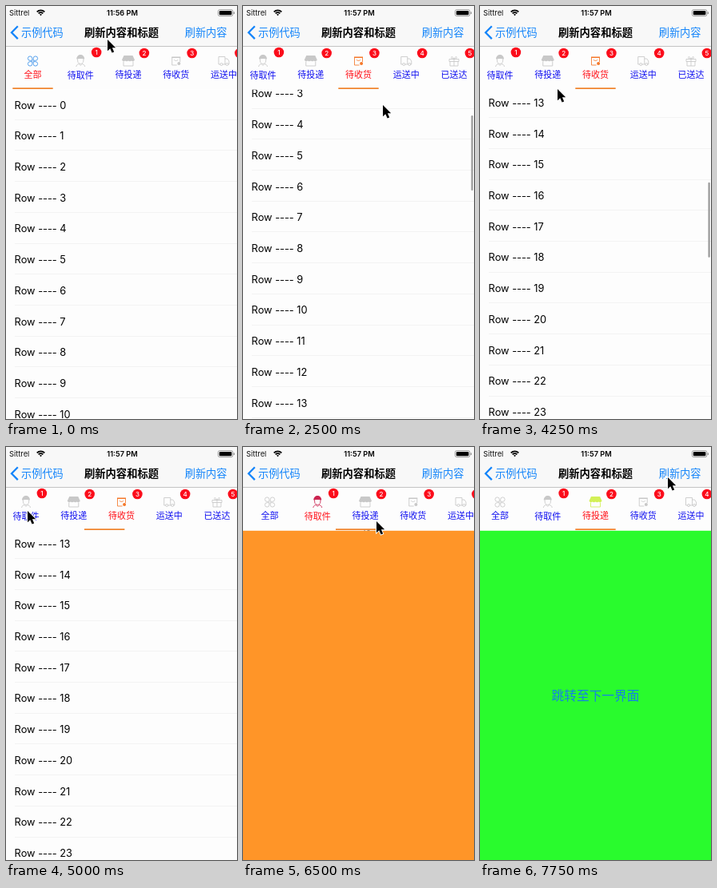
An HTML page with a canvas for the animation above (8 s loop, 289 by 517 pixels).

```html
<!DOCTYPE html>
<html lang="zh">
<head>
<meta charset="utf-8">
<style>
html, body { margin: 0; width: 100%; height: 100%; overflow: hidden; background: #fff; }
canvas { display: block; }
</style>
</head>
<body>
<canvas id="stage" width="289" height="517"></canvas>
<script>
const ctx = document.getElementById('stage').getContext('2d');
const W = 289, H = 517, TOP = 104.5, ROW = 38.72, SCROLL = 506;
const LOOP = 8000, STEP = 250;
const BLUE = '#1485fa', PAPER = '#fdfdfd';
const CJK = '"Noto Sans CJK SC", "Noto Sans CJK", sans-serif';
const LATIN = 'Inter, sans-serif';

// Icons are drawn around (0, 0): label, filled part, stroked part, selected colour
const tabs = [
  ['全部', '', 'M-.7 -.7H-3.4A2.7 2.7 0 1 1 -.7 -3.4ZM.7 -.7V-3.4A2.7 2.7 0 1 1 3.4 -.7ZM-.7 .7V3.4A2.7 2.7 0 1 1 -3.4 .7ZM.7 .7H3.4A2.7 2.7 0 1 1 .7 3.4Z', '#3c92ea'],
  ['待取件', 'M-5 -2.5C-5 -10 5 -10 5 -2.5L3 -3H-3Z', 'M-3.6 -3V0C-3 4.5 3 4.5 3.6 0V-3M-5.5 7C-5 4 -3 4 -2 3.5L0 5.5L2 3.5C3 4 5 4 5.5 7', '#cb2450'],
  ['待投递', 'M-5.5 -7H5.5L8 -1.5C7 .5 5 .5 4 -.5C3 .5 1 .5 0 -.5C-1 .5 -3 .5 -4 -.5C-5 .5 -7 .5 -8 -1.5Z', 'M-6 .5V6H6V.5', '#d3f057'],
  ['待收货', 'M-5.5 -5.5H5.5V-4H-5.5ZM1.6 3A2 2 0 1 1 5.6 3A2 2 0 1 1 1.6 3', 'M1 5H-5V-4.5M5 -4.5V1M-2.4 -2C-2 0 2 0 2.4 -2', '#f5782a'],
  ['运送中', '', 'M-4.5 4H-6.5V-5.5H1.5V4H-1.5M1.5 -3H4.5L6.5 0V4H5.5M1.5 4H2.5M-4.5 4A1.5 1.5 0 1 1 -1.5 4A1.5 1.5 0 1 1 -4.5 4M2.5 4A1.5 1.5 0 1 1 5.5 4A1.5 1.5 0 1 1 2.5 4', '#f5782a'],
  ['已送达', '', 'M-6 -2.5H6V.5H-6ZM-5 .5V6H5V.5M0 -2.5V6M0 -2.5C-6 -3 -3 -9 0 -2.5C3 -9 6 -3 0 -2.5', '#f5782a']
].map(([label, fill, line, color]) => ({ label, color, fill: new Path2D(fill), line: new Path2D(line) }));
const arrow = new Path2D('M0 0V14.2L3.3 11.2L5.6 16.6L8.2 15.5L5.9 10.3H10.2Z');

const taps = [
  { tab: 3, start: 1250, slide: 400 },
  { tab: 1, start: 5166, slide: 300 },
  { tab: 2, start: 6527, slide: 400 }
];
const stops = [
  { arrive: 0, x: 127, y: 42 },
  { arrive: 1000, x: 206, y: 84 },
  { arrive: 2250, x: 175, y: 124 },
  { arrive: 4250, x: 97, y: 104 },
  { arrive: 5000, x: 27, y: 80 },
  { arrive: 6500, x: 167, y: 93 },
  { arrive: 7750, x: 235, y: 38 }
];

const mix = (a, b, u) => a + (b - a) * u;
const progress = (t, start, ms) => Math.min(1, Math.max(0, (t - start) / ms));
const smooth = (t, start, ms) => {
  const u = progress(t, start, ms);
  return u * u * (3 - 2 * u);
};
const easeOut = (t, start, ms) => 1 - (1 - progress(t, start, ms)) ** 2;

const tabCenter = i => 33.5 + 59.75 * i;
const centering = i => Math.max(0, tabCenter(i) - W / 2);

// The underline leads, then the page and the tab strip follow
function stateAt(t) {
  const s = { page: 0, line: 0, offset: 0, selected: 0 };
  for (const { tab, start, slide } of taps) {
    s.line = mix(s.line, tab, smooth(t, start - 250, 312));
    s.page = mix(s.page, tab, smooth(t, start, slide));
    s.offset = mix(s.offset, centering(tab), smooth(t, start, 400));
    if (t > start) s.selected = tab;
  }
  s.scroll = SCROLL * smooth(t, 1750, 2259);
  s.bar = smooth(t, 1750, 400) - smooth(t, 4250, 500);
  return s;
}

function rect(color, x, y, w, h) {
  ctx.fillStyle = color;
  ctx.fillRect(x, y, w, h);
}

function round(color, x, y, w, h, r) {
  ctx.fillStyle = color;
  ctx.beginPath();
  ctx.roundRect(x, y, w, h, r);
  ctx.fill();
}

function text(str, x, y, font, color, align = 'left') {
  ctx.font = font;
  ctx.fillStyle = color;
  ctx.textAlign = align;
  ctx.fillText(str, x, y);
}

function drawList(x, scroll) {
  rect(PAPER, x, TOP, W, H - TOP);
  for (let i = Math.floor(scroll / ROW); TOP + i * ROW - scroll < H; i++) {
    const y = TOP + i * ROW - scroll;
    text('Row ---- ' + i, x + 10.6, y + 24, '12.8px ' + LATIN, '#000');
    rect('#f3f3f3', x + 11, Math.floor(y + ROW) - 1, W - 11, 1);
  }
}

function drawPages({ page, scroll, bar }) {
  ctx.save();
  ctx.beginPath();
  ctx.rect(0, TOP, W, H - TOP);
  ctx.clip();
  for (let i = Math.floor(page); i <= Math.ceil(page); i++) {
    const x = Math.round((i - page) * W);
    if (i === 1) rect('#ff9528', x, TOP, W, H - TOP);
    else if (i === 2) {
      rect('#29fb2d', x, TOP, W, H - TOP);
      text('跳转至下一界面', x + W / 2, 316.5, '15.7px ' + CJK, '#1480e6', 'center');
    } else drawList(x, i === 3 ? scroll : 0);
  }
  ctx.globalAlpha = bar;
  if (page === 3) round('#989898', 285.5, 108 + scroll * .223, 2.2, 94, 1.1);
  ctx.restore();
}

function drawTabs({ offset, line, selected }) {
  rect(PAPER, 0, 51, W, TOP - 51);
  tabs.forEach((tab, i) => {
    const x = tabCenter(i) - offset, on = i === selected, drop = i === 1 ? 1 : 0;
    ctx.save();
    ctx.translate(x, 69);
    ctx.fillStyle = ctx.strokeStyle = on ? tab.color : '#c8c8c8';
    ctx.lineWidth = .85;
    ctx.fill(tab.fill);
    ctx.stroke(tab.line);
    ctx.restore();
    text(tab.label, x, 90 + drop, '11px ' + CJK, on ? '#ff1018' : '#1010f0', 'center');
    if (i) {
      round('#fb0d1b', x + 13.6, 52.7 - drop, 12.6, 12.6, 6.3);
      text(i, x + 19.9, 61.8 - drop, '500 8px ' + LATIN, '#fff', 'center');
    }
  });
  rect('#f08228', tabCenter(line) - offset - 25.2, 102.3, 50.4, 1.7);
}

function drawHeader(t) {
  rect('#f8f8f8', 0, 0, W, 50);
  rect('#c4c4c4', 0, 50, W, 1);
  text('Sittrel', 4, 12, '9.3px ' + LATIN, '#111');
  text(t < 1500 ? '11:56 PM' : '11:57 PM', 145.5, 12, '600 9.2px ' + LATIN, '#000', 'center');

  ctx.strokeStyle = '#000';
  ctx.lineWidth = 1.8;
  for (const r of [1.2, 4, 6.8]) {
    ctx.beginPath();
    ctx.arc(43.5, 12.2, r, -Math.PI * .75, -Math.PI * .25);
    ctx.stroke();
  }
  ctx.lineWidth = .8;
  ctx.strokeStyle = '#888';
  ctx.beginPath();
  ctx.roundRect(265.4, 4.6, 18.4, 8, 2);
  ctx.stroke();
  round('#000', 266.8, 6, 15.6, 5.2, 1);
  round('#888', 284.7, 7.2, 1.2, 2.8, .6);

  ctx.strokeStyle = BLUE;
  ctx.lineWidth = 2.3;
  ctx.stroke(new Path2D('M14.8 25.3L7 33.2L14.8 41.1'));
  text('示例代码', 19, 38, '13.2px ' + CJK, BLUE);
  text('刷新内容和标题', W / 2, 38, '700 13.3px ' + CJK, '#000', 'center');
  text('刷新内容', 223.7, 38, '13.2px ' + CJK, BLUE);
}

function drawCursor(t) {
  let { x, y } = stops[0];
  for (const stop of stops.slice(1)) {
    const u = easeOut(t, stop.arrive - 750, 750);
    x = mix(x, stop.x, u);
    y = mix(y, stop.y, u);
  }
  ctx.save();
  ctx.translate(x, y);
  ctx.strokeStyle = '#fff';
  ctx.lineWidth = 1.8;
  ctx.stroke(arrow);
  ctx.fillStyle = '#000';
  ctx.fill(arrow);
  ctx.restore();
}

function frame() {
  const t = Math.floor(performance.now() % LOOP / STEP) * STEP;
  const state = stateAt(t);
  drawPages(state);
  drawTabs(state);
  drawHeader(t);
  drawCursor(t);
  requestAnimationFrame(frame);
}
frame();
</script>
</body>
</html>
```
